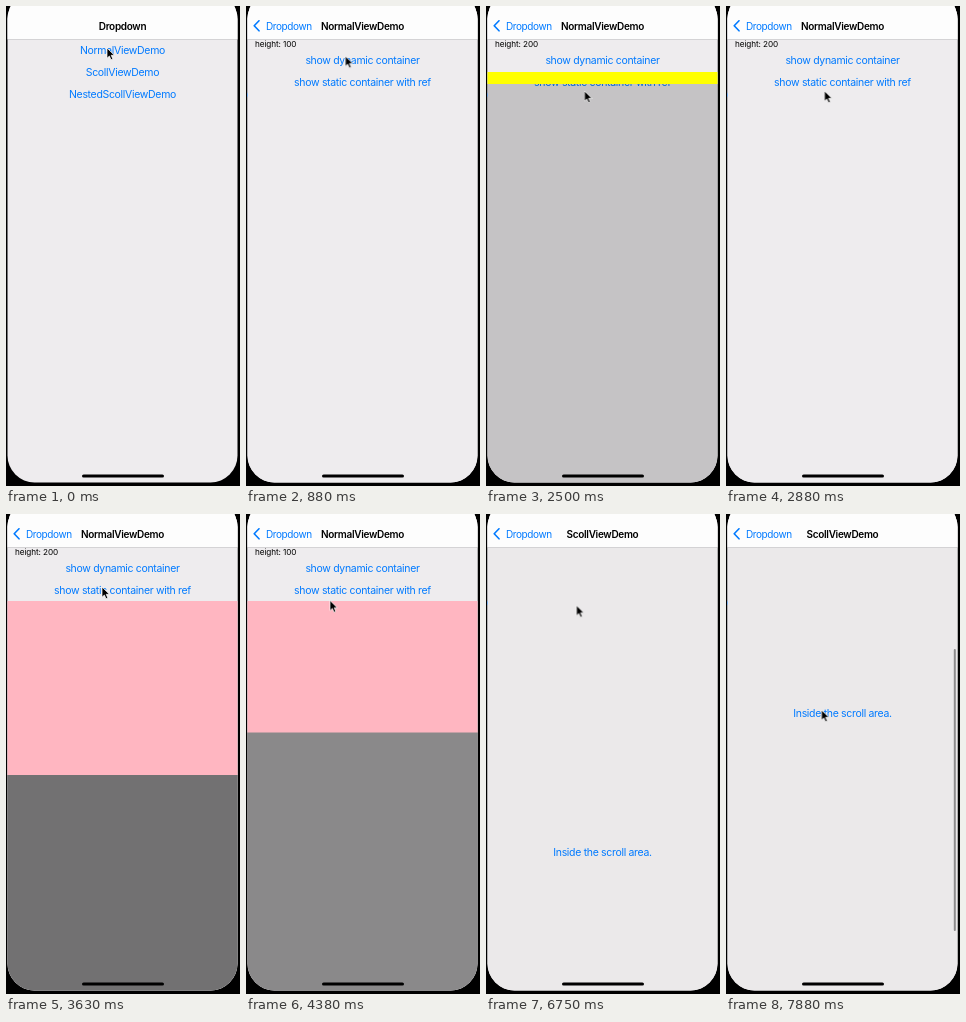
Write an HTML page that moves like this. It is 234 px wide and 480 px high and loops after 8 s.

```html
<!DOCTYPE html>
<html lang="en">
<head>
<meta charset="utf-8">
<title>Dropdown</title>
<style>
  html, body { margin: 0; width: 100%; height: 100%; overflow: hidden; background: #000; }
  svg { display: block; width: 234px; height: 480px; }
  text { font: 10.5px Inter, Roboto, sans-serif; letter-spacing: -.32px; fill: #000; }
  .btn, .back text { fill: #007aff; }
  .btn, .title { text-anchor: middle; }
  .title { font-size: 10px; font-weight: 600; }
  .back text { font-size: 10px; letter-spacing: -.4px; }
  .label { font-size: 8.2px; letter-spacing: -.1px; }
</style>
</head>
<body>
<svg viewBox="0 0 234 480">
  <defs>
    <clipPath id="screen"><rect x="1.5" y="-14" width="230" height="490.5" rx="27"/></clipPath>
    <clipPath id="below66"><rect y="66" width="234" height="414"/></clipPath>
    <clipPath id="below87"><rect y="87" width="234" height="393"/></clipPath>
  </defs>
  <rect width="234" height="480"/>
  <g clip-path="url(#screen)">
    <rect width="234" height="480" fill="#eeecee"/>
    <g id="home">
      <text class="btn" x="116.5" y="48">NormalViewDemo</text>
      <text class="btn" x="116.5" y="70">ScollViewDemo</text>
      <text class="btn" x="116.5" y="92">NestedScollViewDemo</text>
    </g>

    <g id="normal">
      <rect width="234" height="480" fill="#eeecee"/>
      <text class="label" id="h100" x="9" y="41">height: 100</text>
      <text class="label" id="h200" x="9" y="41">height: 200</text>
      <text class="btn" x="116.5" y="58">show dynamic container</text>
      <text class="btn" x="116.5" y="80">show static container with ref</text>
      <g clip-path="url(#below66)">
        <rect id="dim1" y="66" width="234" height="414" fill="#000"/>
        <g id="yellow">
          <rect y="66" width="234" height="58" fill="#ff0"/>
          <text class="label" x="2" y="73">height: 100</text>
          <text class="btn" x="116.5" y="90">hide dynamic container</text>
        </g>
      </g>
      <g clip-path="url(#below87)">
        <rect id="dim2" y="87" width="234" height="393" fill="#000"/>
        <rect id="pink" y="87" width="234" height="174" fill="#ffb6c1"/>
      </g>
    </g>

    <g id="scroll">
      <rect width="234" height="480" fill="#ebe9ea"/>
      <text class="btn" id="inside" x="116.5" y="342">Inside the scroll area.</text>
      <rect id="bar" x="227.8" y="47" width="2" height="282" rx="1" fill="#8c8b8c"/>
    </g>

    <rect width="234" height="33" fill="#fdfdfd"/>
    <rect y="33" width="234" height=".6" fill="#c4c3c5"/>
    <text class="title" id="homeTitle" x="116.5" y="23.7">Dropdown</text>
    <text class="title" id="normalTitle" x="116.5" y="23.7">NormalViewDemo</text>
    <text class="title" id="scrollTitle" x="116.5" y="23.7">ScollViewDemo</text>
    <g class="back">
      <path id="chevron" d="M13 14.8 8.2 19.8 13 24.8" fill="none" stroke="#007aff" stroke-width="1.6" stroke-linecap="round" stroke-linejoin="round"/>
      <text id="backText" x="20" y="23.7">Dropdown</text>
    </g>
    <rect x="76" y="468.4" width="82" height="3.2" rx="1.6"/>
  </g>
  <path id="cursor" d="M0 0V10.2L2.4 8 4 11.7 5.8 10.9 4.2 7.3H7.4Z" stroke="#fff" stroke-width=".7" stroke-linejoin="round"/>
</svg>

<script>
const LOOP = 8000, STEPS = 64, NAV = 500;
const NAV_EASE = 'cubic-bezier(.25,.9,.3,1)';
const PUSH1 = 200, POP = 4940, PUSH2 = 5550;

const x = v => ({ transform: `translateX(${v}px)` });
const y = v => ({ transform: `translateY(${v}px)` });
const at = (px, py) => ({ transform: `translate(${px}px,${py}px)` });
const fade = v => ({ opacity: v });

// rows: [time, style, easing to the next row]
function play(id, rows) {
  const frames = rows.map(([t, style, easing = 'linear']) => ({ ...style, offset: t / LOOP, easing }));
  frames.push({ ...rows[rows.length - 1][1], offset: 1 });
  document.getElementById(id).animate(frames, {
    duration: LOOP, iterations: Infinity, easing: `steps(${STEPS})`
  });
}

// Switches between two states at each navigation time.
function nav(id, from, to, times) {
  const rows = [[0, from]];
  for (const t of times) {
    rows.push([t, from, NAV_EASE], [t + NAV, to]);
    [from, to] = [to, from];
  }
  play(id, rows);
}

const hard = (id, first, second, times) => {
  const rows = [[0, fade(first), 'step-end']];
  times.forEach((t, i) => rows.push([t, fade(i % 2 ? first : second), 'step-end']));
  play(id, rows);
};

const all = [PUSH1, POP, PUSH2], one = [PUSH1, POP], two = [PUSH2];
nav('home', x(0), x(-70), all);
nav('normal', x(232), x(0), one);
nav('scroll', x(232), x(0), two);
nav('homeTitle', { ...x(0), opacity: 1 }, { ...x(-73), opacity: 0 }, all);
nav('backText', { ...x(73), opacity: 0 }, { ...x(0), opacity: 1 }, all);
nav('chevron', fade(0), fade(1), all);
nav('normalTitle', { ...x(150), opacity: 0 }, { ...x(0), opacity: 1 }, one);
nav('scrollTitle', { ...x(150), opacity: 0 }, { ...x(0), opacity: 1 }, two);

hard('h100', 1, 0, [2300, 4280]);
hard('h200', 0, 1, [2300, 4280]);

play('yellow', [[0, y(-60)], [1050, y(-60), 'ease-out'], [1350, y(0)], [2300, y(0), 'ease-in-out'], [2600, y(-60)]]);
play('dim1', [[0, fade(0)], [1050, fade(0)], [1350, fade(.52)], [2300, fade(.52)], [2600, fade(0)]]);
play('pink', [[0, y(-175)], [3250, y(-175), 'ease-out'], [3550, y(0)], [4280, y(0)], [4375, y(-42.5)], [4600, y(-175)]]);
play('dim2', [[0, fade(0)], [3250, fade(0)], [3550, fade(.52)], [4280, fade(.52)], [4375, fade(.42)], [4600, fade(0)]]);

play('inside', [[0, y(0)], [7040, y(0), 'ease-in-out'], [7480, y(-139)]]);
play('bar', [
  [0, { ...y(0), opacity: 0 }], [7040, { ...y(0), opacity: 0 }, 'step-end'],
  [7041, { ...y(0), opacity: 1 }, 'ease-in-out'], [7480, { ...y(88), opacity: 1 }]
]);

play('cursor', [
  [0, at(101, 42)], [700, at(101, 42), 'ease-in-out'],
  [950, at(99, 52)], [2000, at(99, 52), 'ease-in-out'],
  [2200, at(98.5, 85)], [2880, at(98.5, 85), 'ease-in-out'],
  [3150, at(96, 73)], [3750, at(96, 73), 'ease-in-out'],
  [4050, at(91, 104)], [4270, at(91, 104)],
  [4375, at(84, 86.5)], [4600, at(42, 18)], [4950, at(42, 18)],
  [5125, at(72, 57)], [5300, at(88, 65)], [6050, at(88, 65), 'ease-in-out'],
  [6500, at(90.5, 91.5)], [6760, at(90.5, 91.5), 'ease-in-out'],
  [7040, at(97, 247), 'ease-in-out'],
  [7480, at(95, 108)], [7600, at(95, 108), 'ease-in-out'], [7875, at(95.5, 196)]
]);
</script>
</body>
</html>
```
